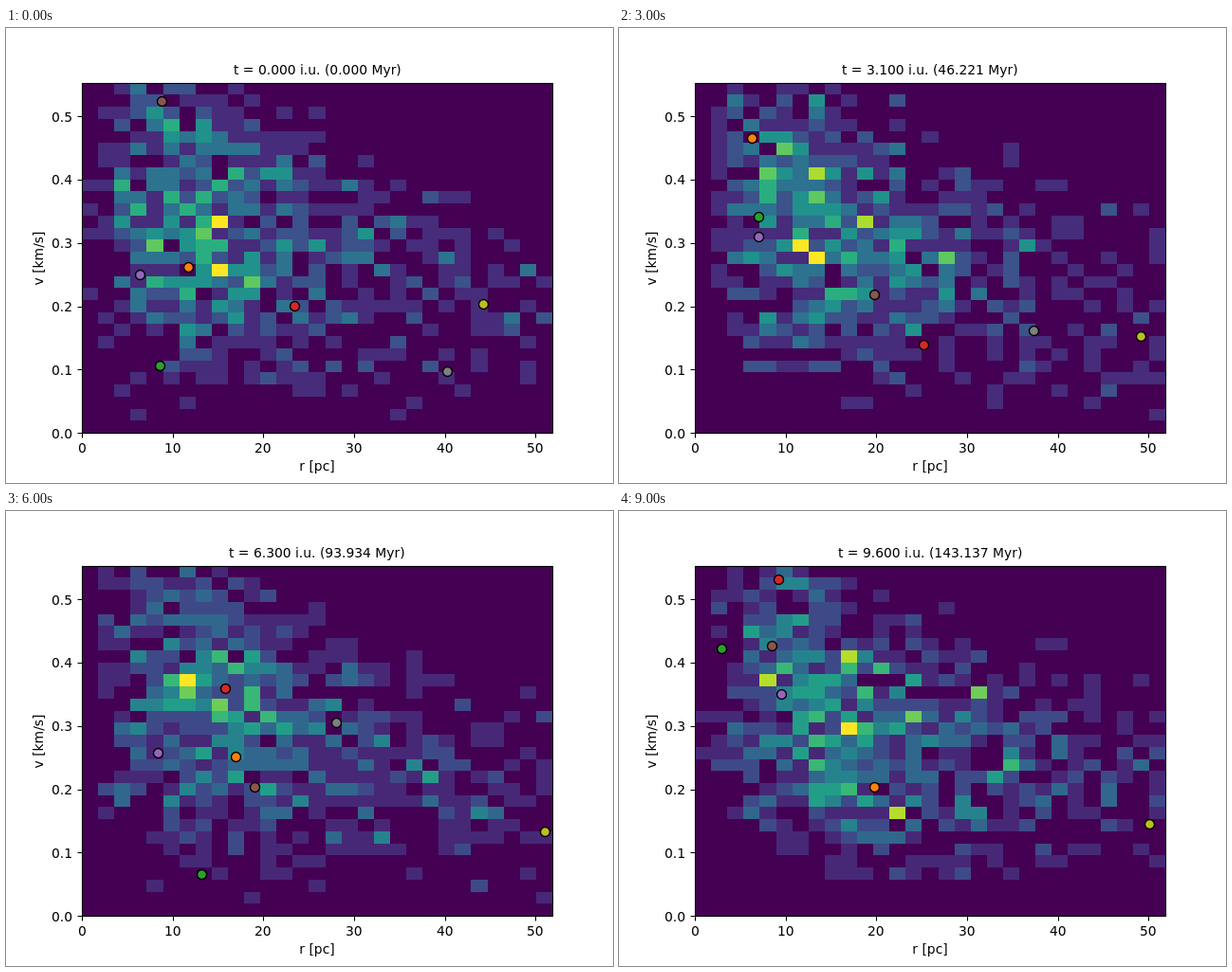
Animation, 640 px wide and 480 px high, one loop 10 s. Source, as an HTML page:

```html
<!DOCTYPE html>
<html lang="en">
<head>
<meta charset="utf-8">
<title>Cluster phase space</title>
<style>
  html, body { margin: 0; width: 100%; height: 100%; overflow: hidden; background: #fff; }
  svg { display: block; width: 640px; height: 480px; font: 13.89px "DejaVu Sans", sans-serif; }
  #cells { shape-rendering: crispEdges; }
  #dots { stroke: #000; stroke-width: 1.39; }
  #axes path, #axes rect { fill: none; stroke: #000; stroke-width: 1.11; }
</style>
</head>
<body>
<svg viewBox="0 0 640 480">
  <clipPath id="plot"><rect x="80" y="58" width="496" height="369"/></clipPath>
  <g id="cells"></g>
  <g clip-path="url(#plot)"><g id="dots"></g></g>
  <g id="axes">
    <rect x="80.5" y="58.5" width="496" height="369"/>
    <text text-anchor="middle" x="328" y="467">r [pc]</text>
    <text text-anchor="middle" transform="translate(39 243) rotate(-90)">v [km/s]</text>
  </g>
  <text id="title" y="49"></text>
</svg>
<script>
const GRID = 29, LEFT = 80, TOP = 57.6, WIDTH = 496, HEIGHT = 369.6;
const R_MAX = 51.85, V_MAX = 0.5537;
const STEPS = 10, MYR_PER_UNIT = 14.91013;

// Star positions at the knot steps; splines fill the steps between.
const KNOTS = [0, 1, 3, 5, 6, 7, 9];
const STARS = {
  '#ff7f0e': [[192, 252], [169, 200], [140, 116], [213, 223], [242, 259], [261, 283], [269, 291]],
  '#2ca02c': [[162, 356], [131, 223], [147, 199], [205, 367], [206, 383], [187, 293], [108, 145]],
  '#d62728': [[304, 293], [323, 337], [321, 334], [275, 250], [231, 187], [173, 126], [168, 72]],
  '#9467bd': [[141, 260], [138, 229], [147, 220], [173, 303], [160, 255], [142, 209], [171, 193]],
  '#8c564b': [[164, 77], [216, 170], [269, 281], [274, 280], [262, 291], [236, 241], [161, 142]],
  '#7f7f7f': [[465, 362], [461, 355], [437, 319], [387, 263], [348, 223], [300, 175], [195, 48]],
  '#bcbd22': [[503, 291], [524, 306], [550, 325], [565, 336], [568, 338], [568, 338], [559, 330]]
};

const VIRIDIS = ['440154', '482475', '414487', '355f8d', '2a788e', '21918c',
  '22a884', '44bf70', '7ad151', 'bddf26', 'fde725'];

const byId = id => document.getElementById(id);
const xOf = r => LEFT + WIDTH * r / R_MAX;
const yOf = v => TOP + HEIGHT * (1 - v / V_MAX);

function add(parent, tag, attrs, text = '') {
  const node = document.createElementNS('http://www.w3.org/2000/svg', tag);
  for (const key in attrs) node.setAttribute(key, attrs[key]);
  node.textContent = text;
  return byId(parent).appendChild(node);
}

// Puts a text on a whole pixel; align 0.5 centres it at x, 1 ends it there.
function alignText(node, x, align) {
  node.setAttribute('x', Math.round(x - align * node.getComputedTextLength()));
}

function randomFrom(seed) {
  return () => {
    seed = (seed + 0x6D2B79F5) | 0;
    let x = Math.imul(seed ^ (seed >>> 15), 1 | seed);
    x = (x + Math.imul(x ^ (x >>> 7), 61 | x)) ^ x;
    return ((x ^ (x >>> 14)) >>> 0) / 4294967296;
  };
}

function poisson(mean, random) {
  const limit = Math.exp(-mean);
  let count = 0;
  for (let p = random(); p > limit; p *= random()) count++;
  return count;
}

// Expected stars per cell in a slowly expanding Plummer sphere.
function density(col, row, step) {
  const r = (col + 0.5) * R_MAX / GRID;
  const v = (GRID - row - 0.5) * V_MAX / GRID;
  const scale = 13 + 0.25 * step;
  const spread = 1 + (r / scale) ** 2;
  const escape = (0.85 - 0.005 * step) * spread ** -0.25;
  const q2 = (v / escape) ** 2;
  if (q2 >= 1) return 0;
  return (12 / scale) ** 2 * r * r * spread ** -2.5 * q2 * (1 - q2) ** 3.5 / escape;
}

function viridis(x) {
  const i = Math.min(9, Math.floor(x * 10)), f = x * 10 - i;
  const channel = (hex, k) => parseInt(hex.slice(2 * k, 2 * k + 2), 16);
  const mix = [0, 1, 2].map(k =>
    Math.round(channel(VIRIDIS[i], k) * (1 - f) + channel(VIRIDIS[i + 1], k) * f));
  return `rgb(${mix})`;
}

function histogram(step) {
  const random = randomFrom(step * 977 + 41);
  const counts = Array.from({ length: GRID * GRID }, (_, i) =>
    poisson(density(i % GRID, Math.floor(i / GRID), step), random));
  const top = Math.max(...counts);
  return counts.map(n => viridis(n / top));
}

// Cubic Hermite spline through the knots.
function starAt(path, step) {
  const last = KNOTS.length - 1;
  const i = Math.min(last - 1, KNOTS.findLastIndex(k => k <= step));
  const span = KNOTS[i + 1] - KNOTS[i], u = (step - KNOTS[i]) / span;
  return [0, 1].map(axis => {
    const slope = k => {
      const a = Math.max(0, k - 1), b = Math.min(last, k + 1);
      return span * (path[b][axis] - path[a][axis]) / (KNOTS[b] - KNOTS[a]);
    };
    const from = path[i][axis], to = path[i + 1][axis];
    return from + (to - from) * u * u * (3 - 2 * u)
      + u * (1 - u) * (slope(i) * (1 - u) - slope(i + 1) * u);
  });
}

const edgeX = i => Math.round(LEFT + WIDTH * i / GRID);
const edgeY = i => Math.round(TOP + HEIGHT * i / GRID);
const cells = Array.from({ length: GRID * GRID }, (_, i) => {
  const c = i % GRID, r = Math.floor(i / GRID);
  return add('cells', 'rect', {
    x: edgeX(c), y: edgeY(r), width: edgeX(c + 1) - edgeX(c), height: edgeY(r + 1) - edgeY(r)
  });
});
const dots = Object.keys(STARS).map(fill => add('dots', 'circle', { r: 5, fill }));

for (let i = 0; i <= 5; i++) {
  const x = xOf(i * 10), y = yOf(i / 10);
  add('axes', 'path', { d: `M${Math.round(x) + 0.5} 427.5v5M80.5 ${Math.round(y) + 0.5}h-5` });
  alignText(add('axes', 'text', { y: 448 }, String(i * 10)), x, 0.5);
  alignText(add('axes', 'text', { y: Math.round(y + 5.3) }, (i / 10).toFixed(1)), 70.3, 1);
}

// Simulation time is sampled on a 0.1 grid, slightly faster towards the end.
const steps = Array.from({ length: STEPS }, (_, step) => {
  const time = Math.round(10.3 * step + 0.04 * step * step) / 10;
  return {
    title: `t = ${time.toFixed(3)} i.u. (${(time * MYR_PER_UNIT).toFixed(3)} Myr)`,
    colors: histogram(step),
    stars: Object.values(STARS).map(path => starAt(path, step))
  };
});

let shown = -1;
function show(step) {
  if (step === shown) return;
  shown = step;
  const { title, colors, stars } = steps[step];
  byId('title').textContent = title;
  alignText(byId('title'), 327.9, 0.5);
  cells.forEach((cell, i) => cell.setAttribute('fill', colors[i]));
  dots.forEach((dot, i) => {
    dot.setAttribute('cx', stars[i][0] + 0.5);
    dot.setAttribute('cy', stars[i][1] + 0.5);
  });
}

const start = performance.now();
function tick() {
  show(Math.floor((performance.now() - start) / 1000) % STEPS);
  requestAnimationFrame(tick);
}
tick();
</script>
</body>
</html>
```
